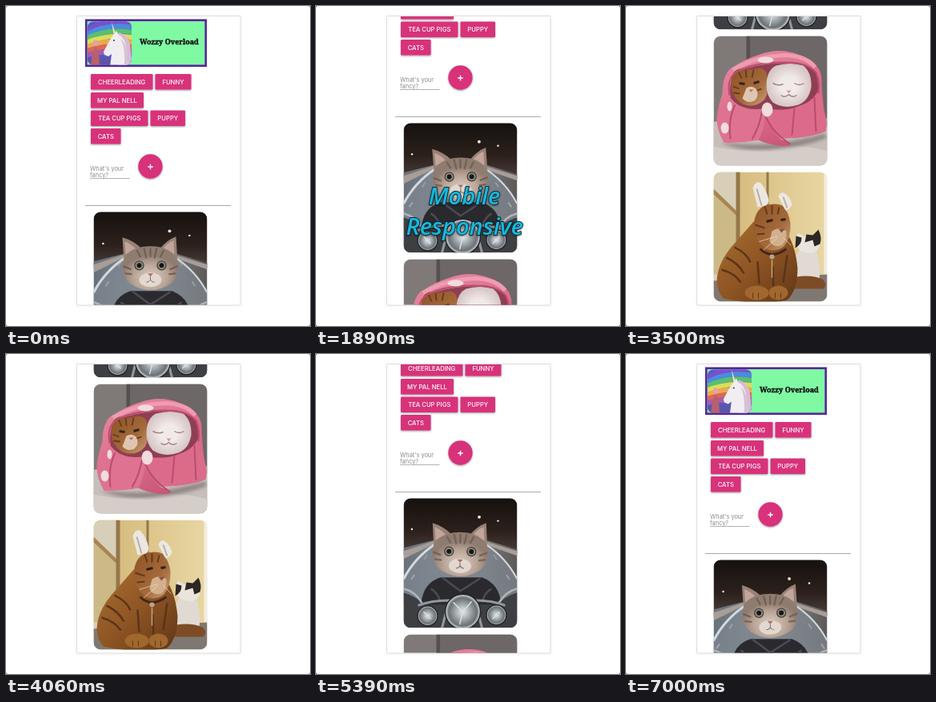
An HTML page for the animation above (7.07 s loop, 380 by 400 pixels).

```html
<!DOCTYPE html>
<html lang="en">
<head>
<meta charset="utf-8">
<title>Mobile page scroll</title>
<style>
  html, body { margin: 0; width: 100%; height: 100%; overflow: hidden; background: #fff; }
  svg { display: block; width: 380px; height: 400px; }
  .ui { font-family: Inter, Roboto, sans-serif; }
  .label { font-size: 7.7px; font-weight: 500; fill: #fff; text-anchor: middle; }
  .brand { font: 900 9px "Noto Serif", serif; fill: #101010; stroke: #101010; stroke-width: .35; }
  .hint { font-size: 7.4px; fill: #8b8b8b; }
  .caption { font: italic 600 29px "Open Sans", "Noto Sans", sans-serif; text-anchor: middle;
    fill: #19b9dd; stroke: #0b2530; stroke-width: 1.8; paint-order: stroke; stroke-linejoin: round; }
</style>
</head>
<body>
<svg viewBox="0 0 380 400" xmlns="http://www.w3.org/2000/svg">
  <defs>
    <clipPath id="screen"><rect x="89" y="13" width="203.5" height="360.5"/></clipPath>
    <clipPath id="photo"><rect width="142" height="162" rx="9"/></clipPath>
    <clipPath id="thumb"><rect x="102" y="19.5" width="55" height="54" rx="7"/></clipPath>
    <linearGradient id="night" x2="0" y2="1">
      <stop offset="0" stop-color="#15110f"/><stop offset=".6" stop-color="#2c211c"/><stop offset="1" stop-color="#4b403b"/>
    </linearGradient>
    <linearGradient id="road" x2="1">
      <stop offset="0" stop-color="#66717a"/><stop offset=".5" stop-color="#8b9198"/><stop offset="1" stop-color="#5c5957"/>
    </linearGradient>
    <radialGradient id="fur" cy=".7">
      <stop offset="0" stop-color="#dccdc1"/><stop offset=".6" stop-color="#b9a597"/><stop offset="1" stop-color="#8f7c70"/>
    </radialGradient>
    <radialGradient id="lamp">
      <stop offset="0" stop-color="#e9ecee"/><stop offset=".55" stop-color="#8f969a"/><stop offset=".8" stop-color="#6a7074"/><stop offset="1" stop-color="#e2e5e7"/>
    </radialGradient>
    <linearGradient id="ginger" x2="1" y2="1">
      <stop offset="0" stop-color="#a9702f"/><stop offset=".5" stop-color="#8f5524"/><stop offset="1" stop-color="#5f3617"/>
    </linearGradient>
    <linearGradient id="face" x2="1" y2="1">
      <stop offset="0" stop-color="#8d5226"/><stop offset=".6" stop-color="#a4693a"/><stop offset="1" stop-color="#c9a27c"/>
    </linearGradient>
    <radialGradient id="white">
      <stop offset=".4" stop-color="#f1eae8"/><stop offset="1" stop-color="#d6c6c6"/>
    </radialGradient>
    <linearGradient id="blanket" x2=".6" y2="1">
      <stop offset="0" stop-color="#e88aa3"/><stop offset=".6" stop-color="#de6d8c"/><stop offset="1" stop-color="#c95678"/>
    </linearGradient>
    <linearGradient id="wall" x2="1"><stop offset="0" stop-color="#d2b574"/><stop offset="1" stop-color="#e8d7a4"/></linearGradient>
    <filter id="soft" x="-10%" y="-10%" width="120%" height="120%"><feGaussianBlur stdDeviation="2"/></filter>
    <filter id="blur" x="-10%" y="-10%" width="120%" height="120%"><feGaussianBlur stdDeviation=".7"/></filter>
    <filter id="drop" x="-20%" y="-30%" width="140%" height="180%">
      <feDropShadow dx="0" dy="1" stdDeviation=".8" flood-opacity=".4"/>
    </filter>
  </defs>

  <rect width="380" height="400" fill="#444"/>
  <rect width="380" height="400" rx="2" fill="#fff"/>
  <rect x="88" y="12" width="206" height="363" fill="#ddd" opacity=".4" filter="url(#soft)"/>
  <rect x="88.5" y="12.5" width="204.5" height="361.5" rx="1" fill="#fff" stroke="#dedede"/>

  <g clip-path="url(#screen)">
    <g id="page" class="ui">
      <rect x="100.25" y="17.75" width="149.5" height="57" fill="#7ffaa3" stroke="#57249b" stroke-width="2.6"/>
      <g clip-path="url(#thumb)">
        <rect x="102" y="19" width="56" height="55" fill="#5157c8"/>
        <g id="rainbow" fill="none" stroke-width="6" filter="url(#blur)"></g>
        <path d="M102 66q14-5 26-1t30-2v12h-56z" fill="#5c55a8"/>
        <g id="unicorn">
          <path d="M141 33q11 3 14 15l3 28h-18z" fill="#d9b9d6"/>
          <path d="M135 35l3-4 3 5q7 4 9 14l3 26h-23l2-16-4 3-5-2-1-4 7-13z" fill="#f1edf0"/>
          <path d="M143 41q6 9 5 33h4q1-26-9-33z" fill="#d3c3d4"/>
          <path d="M134.500 35l-2.500-15 5 14z" fill="#efe0c0"/>
          <circle cx="135" cy="43" r="1.100" fill="#473a50"/>
        </g>
        <path d="M106 74l2-15 4-9 4 7 1 17z" fill="#b7606f"/><circle cx="112" cy="46" r="3.500" fill="#e2a0b1"/>
      </g>
      <text class="brand" x="167" y="47.5">Wozzy Overload</text>
      <g id="buttons"></g>
      <text class="hint" x="105" y="206">What's your</text>
      <text class="hint" x="105" y="213.6">fancy?</text>
      <path d="M105 215.5h49.500" stroke="#aaa" stroke-width=".9"/>
      <circle cx="180.500" cy="200.500" r="15.200" fill="#d8327a" filter="url(#drop)"/>
      <path d="M177.300 201h6.400M180.500 197.800v6.400" stroke="#fff" stroke-width="1.400"/>
      <path d="M99 249.500h182" stroke="#a9a9a9"/>

      <g transform="translate(109.500 257.300)"><g clip-path="url(#photo)">
        <rect width="142" height="70" fill="url(#night)"/>
        <g id="lights" fill="#fff3da"></g>
        <path d="M0 62l40-10h62l40 12v98H0z" fill="url(#road)"/>
        <path d="M0 66l40-13v3L0 76zM142 66l-40-12v4l40 14z" fill="#a89d97"/>
        <path d="M0 100Q14 74 40 57q31-11 62 0 28 17 40 43v30H0z" fill="#7f8890" opacity=".7"/>
        <g fill="none" stroke="#d3d9dd" filter="url(#blur)">
          <path d="M0 101Q14 74 40 57" stroke-width="3"/><path d="M142 101Q128 74 102 57" stroke-width="2"/>
        </g>
        <g id="dashes" stroke="#e6eaec" stroke-width="2" fill="none"></g>
        <path d="M22 132q2-26 24-33h52q22 8 24 34l-12 29H32z" fill="#2a2a2e"/>
        <path d="M48 99l23 17 25-16M34 113q9 5 12 17M110 113q-9 5-12 17" fill="none" stroke="#4b4b51" stroke-width="2.500"/>
        <path d="M0 118q17 5 24 15h95q6-10 23-15v44H0z" fill="#3d3f43"/>
        <path d="M0 113q15 4 23 18M142 113q-15 4-23 18" fill="none" stroke="#aeb4b8" stroke-width="2.500"/>
        <path d="M18 134q26-9 55-5 29-4 54 5M48 162l9-35M98 162l-9-35" fill="none" stroke="#93989c" stroke-width="3"/>
        <g fill="url(#lamp)" stroke="#242628" stroke-width="1.500">
          <circle cx="30" cy="147" r="12.500"/><circle cx="116" cy="146" r="12.500"/><circle cx="74" cy="142" r="22"/>
        </g>
        <path d="M62 130l12 12 11-13M74 142l-4 16M25 142l9 9M111 151l9-9" fill="none" stroke="#d9dee0" stroke-width="1.500"/>
        <g id="rider">
          <path d="M38 63L36 32q14 4 24 14h23q9-11 20-15l2 33z" fill="#968276"/>
          <path d="M40 53l-1-16q8 3 14 10zM101 53l-1-17q-8 3-14 11z" fill="#c4a59b"/>
          <path d="M36 70q0-19 19-25 16-4 32 0 19 7 19 25-2 17-15 23-20 10-40 0-14-7-15-23z" fill="url(#fur)"/>
          <path d="M71 45v12M63 45l3 13M79 45l-3 13M54 48l5 9M88 48l-5 9M37 68l10 4M39 77l9 1M105 68l-10 4M103 77l-9 1"
            fill="none" stroke="#705d51" stroke-width="2" filter="url(#blur)"/>
          <ellipse cx="71" cy="85" rx="14" ry="9" fill="#e3d8cf"/>
          <g fill="#8f9184" stroke="#4a3e38" stroke-width="1.300"><circle cx="57" cy="67" r="5.500"/><circle cx="85" cy="67" r="5.500"/></g>
          <g fill="#171616"><circle cx="57" cy="67" r="3"/><circle cx="85" cy="67" r="3"/></g>
          <path d="M67.500 77h7l-3.500 4z" fill="#a86f67"/>
          <path d="M71 81v4m-5 3q3 0 5-3 2 3 5 3" fill="none" stroke="#7d695e"/>
        </g>
      </g></g>

      <g transform="translate(109.500 427.500)"><g clip-path="url(#photo)">
        <rect width="142" height="162" fill="#7f7a78"/>
        <path d="M41 0h5v70h-5z" fill="#565150"/><path d="M46 0h96v112H46z" fill="#6d6767"/>
        <path d="M0 107l142-4v59H0z" fill="#c6beb8"/>
        <path d="M0 138q35 8 72 2t70 4v18H0z" fill="#d4cdc8"/>
        <path d="M9 133q30 4 60 2t70-13l3 5q-30 12-70 15-40 2-63-9z" fill="#8f8583" filter="url(#soft)"/>
        <path d="M23 40Q38 29 58 23 82 14 106 23q17 5 23 15 7 7 6 22l3 33q5 15 2 26-22 9-58 9l15 7q-3 4-17 2-14-2-24-7-20 3-43 3-8-14-9-31 1-12 7-30 0-24 12-33z" fill="url(#blanket)"/>
        <path d="M22 82q-5-28 8-37 22-10 54-11 28-2 41 8 9 14 4 38L104 92H40z" fill="#8f3f52"/>
        <path d="M22 61q0-18 10-20 9 2 20 0 10-3 14 5 5 24-3 34-12 11-27 5-13-8-14-24z" fill="url(#face)"/>
        <path d="M31 44l4 9M40 42l1 10M50 42l-2 10M24 63l8 3M25 71l8 1M60 66l-6 2" stroke="#643a20" stroke-width="1.800" filter="url(#blur)"/>
        <path d="M41 65q7-4 12 1 5 9-2 15-9 4-15-3z" fill="#dfc6b0"/>
        <path d="M32 59l7 1M50 59l7-2" stroke="#34241b" stroke-width="3"/>
        <path d="M44 67h6l-3 3z" fill="#b46c62"/>
        <path d="M66 62q0-19 12-25 18-5 34 0 11 9 10 27-3 17-16 22-18 6-32-3-8-9-8-21z" fill="url(#white)"/>
        <path d="M74 59q7 4 13 1M101 59q6 4 12 0M94 73q-5 5-10 1m10-1q4 5 10 1" fill="none" stroke="#9a8785" stroke-width="1.500"/>
        <path d="M91 68h6l-3 4z" fill="#d99a9c"/>
        <path d="M22 78q12 16 40 13 5 18-6 39-24 4-43 3Q4 118 4 103q4-17 18-25z" fill="#df7290"/>
        <path d="M62 91q26 5 46-4 17-5 25-23l5 29q4 15 2 26-22 9-58 9Q67 112 62 91z" fill="#dc6b8a"/>
        <g fill="none" stroke="#b94d6f" stroke-width="2" filter="url(#blur)">
          <path d="M61 91q-3 22-13 38M63 93q6 25 33 42M27 86q-9 17-6 43M101 90l-3 34M126 76l2 44"/>
          <path d="M20 74q-4-22 10-30 24-12 62-11 25 0 36 13 5 10 3 26"/>
        </g>
        <path d="M24 42q30-17 66-18 25 1 37 15" fill="none" stroke="#ee9db1" stroke-width="5" filter="url(#blur)"/>
        <g fill="#f1dcdc"><ellipse cx="65" cy="30" rx="10" ry="4"/><ellipse cx="14" cy="115" rx="5" ry="7"/><ellipse cx="67" cy="92" rx="7" ry="9"/><ellipse cx="20" cy="88" rx="3" ry="6"/></g>
      </g></g>

      <g transform="translate(109.500 597.500)"><g clip-path="url(#photo)">
        <rect width="142" height="162" fill="url(#wall)"/>
        <path d="M0 0h31v140H0z" fill="#d8cfb9"/><path d="M0 21l32 31v6L0 28z" fill="#a98550"/>
        <path d="M0 28l32 30v70H0z" fill="#ccb988"/>
        <path d="M28 0h5v110h-5zM66 0h3v110h-3z" fill="#94774a"/><path d="M138 0h4v140h-4z" fill="#f2ecdd"/>
        <path d="M0 136l142-8v34H0z" fill="#7f7872"/>
        <path d="M100 138q-4-26 9-43h18q8 18 5 43z" fill="#e1dad3"/>
        <path d="M103 90q-2-9 3-14l8 5h10l6-8 4 11q0 13-9 17-17 3-22-11z" fill="#eae4de"/>
        <path d="M102 95l1-15 7 2q0 9-8 13zM114 88l2-10 8 1 7-7q5 10 2 18l-7 3-2-8z" fill="#2b2725"/>
        <path d="M90 134q28-8 46 0 7 7 1 12H90z" fill="#7d4c27"/>
        <path d="M50 62q-12 14-28 32-18 22-18 44 1 12 8 20 44 10 80 2 13-12 13-40-3-30-15-46z" fill="url(#ginger)"/>
        <path d="M16 107q15 7 22 20M10 122q17 5 24 16M26 94q16 8 20 19M74 118l1 28M92 104l-5 34M55 112l2 28"
          fill="none" stroke="#5b3418" stroke-width="2.500" filter="url(#blur)"/>
        <path d="M50 68q1-20 14-26 13-4 22 0 8 8 10 22 1 18-8 29-9 7-20 4-16-8-18-29z" fill="url(#face)"/>
        <path d="M64 43l3 10M73 42v11M82 44l-2 9M52 66l12 4M54 78l10-1" stroke="#643819" stroke-width="2" filter="url(#blur)"/>
        <path d="M73 74q9-7 18 0 1 12-6 18-11 3-15-6z" fill="#d2b08c"/>
        <path d="M66 62l8-2M84 60l6-1" stroke="#2f2114" stroke-width="3"/>
        <path d="M81 71h8l-4 5z" fill="#8a4f42"/>
        <path d="M80 80l-23 7M80 82L62 98M87 82l10 10" stroke="#ecdcc8" stroke-width=".7"/>
        <path d="M49 20q3-9 9-7 8 8 11 22 0 6-5 7l-9 2zM81 31q2-6 7-5 8 5 10 14-1 6-8 8z" fill="#ece7e1"/>
        <path d="M54 21l6 21M87 31l5 14" stroke="#b8afaa" stroke-width="2" filter="url(#blur)"/>
        <path d="M58 96q14 14 33 0" fill="none" stroke="#43281c" stroke-width="3"/>
        <circle cx="73" cy="106" r="3" fill="#b8a689"/><path d="M73 110v22" stroke="#c9a679" stroke-width="1.500"/>
        <g fill="#a0672f"><ellipse cx="54" cy="151" rx="15" ry="9"/><ellipse cx="81" cy="151" rx="12" ry="9"/></g>
        <path d="M49 151v7m7-7v7m21-7v7m7-7v7" stroke="#5f3818"/>
      </g></g>
    </g>
  </g>
  <g id="caption" class="caption" filter="url(#drop)">
    <text x="185.500" y="247.700">Mobile</text><text x="185.800" y="285.700">Responsive</text>
  </g>
</svg>
<script>
const LOOP = 7070, STEP = 70;
const $ = id => document.getElementById(id);

const buttons = [
  ["CHEERLEADING", 106, 85, 77.5], ["FUNNY", 186.5, 85, 45],
  ["MY PAL NELL", 106, 108, 66], ["TEA CUP PIGS", 106, 130.5, 71.5],
  ["PUPPY", 180.5, 130.5, 43.5], ["CATS", 106, 153, 37.5]
];
$("buttons").innerHTML = buttons.map(([name, x, y, w]) =>
  `<rect x="${x}" y="${y}" width="${w}" height="19.5" rx="1.2" fill="#d8327a" filter="url(#drop)"/>
   <text class="label" x="${x + w / 2}" y="${y + 12.8}">${name}</text>`).join("");

$("rainbow").innerHTML = ["#7a4fc9", "#4b8be0", "#58c070", "#dade58", "#eda94a", "#dd6658", "#a65cab"]
  .map((c, i) => `<path d="M98 ${32 + i * 5}Q128 ${12 + i * 7} 162 ${22 + i * 6}" stroke="${c}"/>`).join("");

// Scroll offsets in px, joined by a monotone cubic.
const keys = [[0, 0], [1260, 0], [1610, 50], [1890, 111], [2870, 300], [3430, 390],
  [4130, 390], [4620, 299], [5390, 77], [6160, 0], [LOOP, 0]];
const slope = i => (keys[i + 1][1] - keys[i][1]) / (keys[i + 1][0] - keys[i][0]);
function tangent(i) {
  if (i === 0 || i === keys.length - 1) return 0;
  const a = slope(i - 1), b = slope(i);
  return a * b <= 0 ? 0 : 2 * a * b / (a + b);
}
function scrollAt(t) {
  let i = 0;
  while (i < keys.length - 2 && t >= keys[i + 1][0]) i++;
  const [t0, y0] = keys[i], [t1, y1] = keys[i + 1];
  const d = t1 - t0, u = (t - t0) / d, v = 1 - u;
  return y0 * v * v * (1 + 2 * u) + y1 * u * u * (3 - 2 * u)
    + d * u * v * (tangent(i) * v - tangent(i + 1) * u);
}

function draw(t) {
  const wave = (period, shift = 0) => Math.sin(t / period * 2 * Math.PI + shift);
  $("page").setAttribute("transform", `translate(0 ${-Math.round(scrollAt(t))})`);
  $("caption").style.display = t >= 1330 && t < 3290 ? "" : "none";
  $("rider").setAttribute("transform",
    `translate(${wave(LOOP / 9) * .5} ${wave(LOOP / 13) * .8}) rotate(${wave(LOOP / 7)} 71 75)`);
  $("unicorn").setAttribute("transform", `translate(${wave(LOOP / 5) * .8} ${wave(LOOP / 8)})`);
  $("lights").innerHTML = [[95, 24], [119, 29], [11, 39]].map(([x, y], i) =>
    `<circle cx="${x + wave(LOOP / 6, i)}" cy="${y + wave(LOOP / 10, i) * .7}" r="${i ? 1.2 : 1.9}"/>`).join("");
  $("dashes").innerHTML = [0, .5].map(p => {
    const u = (t / LOOP * 14 + p) % 1, y = 62 + u * 50;
    return `<path d="M${35 - u * 32} ${y}l-4 6M${107 + u * 32} ${y}l4 6" opacity="${.2 + u * .2}"/>`;
  }).join("");
}

function tick() {
  draw(Math.floor(performance.now() % LOOP / STEP) * STEP);
  requestAnimationFrame(tick);
}
tick();
</script>
</body>
</html>
```
